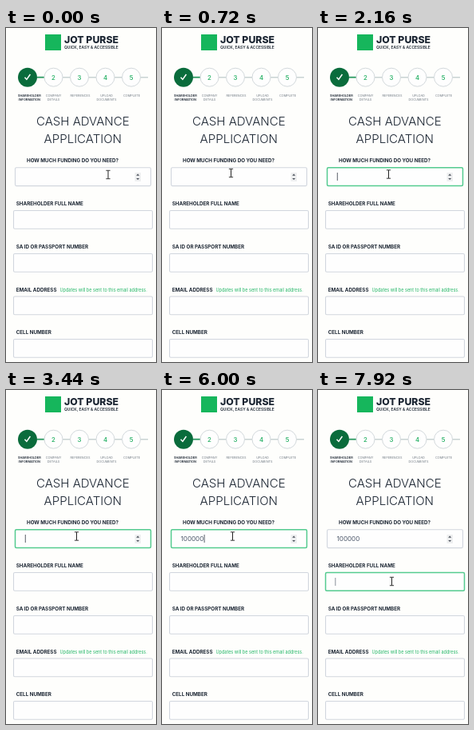
These frames come from a looping animation (188 px wide and 418 px high, 8000 ms). An HTML page with a canvas:

```html
<!DOCTYPE html>
<html lang="en">
<head>
<meta charset="utf-8">
<title>Cash advance application</title>
<style>
html, body { margin: 0; width: 100%; height: 100%; overflow: hidden; background: #fefefc; }
canvas { display: block; width: 188px; height: 418px; }
</style>
</head>
<body>
<canvas id="stage"></canvas>
<script>
const W = 188, H = 418, LOOP = 8000, BLINK = 530;
const canvas = document.getElementById('stage');
const ctx = canvas.getContext('2d');
const scale = window.devicePixelRatio || 1;
canvas.width = W * scale;
canvas.height = H * scale;

const INK = '#1c2633', GREEN = '#1fae60', DARK = '#0a6c3c', FOCUS = [84, 203, 143], IDLE = [209, 214, 222];
const FOCUS_AMOUNT = 960, FOCUS_NAME = 7600;
const KEYS = [3600, 4400, 4960, 5280, 5600, 5840];
const AMOUNT = '100000';
const STEP_Y = 61.7;

// time, x, y
const POINTER = [
  [80, 128, 183.5], [640, 86.5, 181.5], [720, 86.5, 181.5], [880, 88.5, 183],
  [6400, 88.5, 183], [6880, 85, 252.5], [7280, 85, 252.5], [7600, 92.5, 239.5]
];

const STEPS = [
  [27, 29.3, 'SHAREHOLDER', 'INFORMATION'],
  [59.5, 59.5, 'COMPANY', 'DETAILS'],
  [92, 93, 'REFERENCES', ''],
  [124.5, 126, 'UPLOAD', 'DOCUMENTS'],
  [157, 157.5, 'COMPLETE', '']
];

const FIELDS = [
  ['SHAREHOLDER FULL NAME', 228.5],
  ['SA ID OR PASSPORT NUMBER', 282.5],
  ['EMAIL ADDRESS', 336],
  ['CELL NUMBER', 389.5]
];

const clamp = v => Math.max(0, Math.min(1, v));
const ease = v => v * v * (3 - 2 * v);

function text(str, x, mid, size, weight, color, align = 'left') {
  ctx.font = `${weight} ${size}px Inter, "Open Sans", sans-serif`;
  ctx.textAlign = align;
  ctx.fillStyle = color;
  ctx.fillText(str, x, mid + size * 0.364);
}

function line(points, color, width) {
  ctx.beginPath();
  points.forEach(([x, y]) => ctx.lineTo(x, y));
  ctx.strokeStyle = color;
  ctx.lineWidth = width;
  ctx.stroke();
}

function circle(x, y, r, fill, stroke) {
  ctx.beginPath();
  ctx.arc(x, y, r, 0, Math.PI * 2);
  ctx.fillStyle = fill;
  ctx.fill();
  if (!stroke) return;
  ctx.strokeStyle = stroke;
  ctx.lineWidth = 1;
  ctx.stroke();
}

function field(x, y, w, focus) {
  const rgb = IDLE.map((c, i) => Math.round(c + (FOCUS[i] - c) * focus));
  ctx.beginPath();
  ctx.roundRect(x, y, w, 22.8, 1.5);
  ctx.fillStyle = '#fefefe';
  ctx.fill();
  ctx.strokeStyle = `rgb(${rgb})`;
  ctx.lineWidth = 1.1 + 0.4 * focus;
  ctx.stroke();
}

function caret(x, mid, age, color) {
  if (Math.floor(age / BLINK) % 2) return;
  line([[x, mid - 5], [x, mid + 5]], color, 0.8);
}

function header() {
  ctx.fillStyle = '#16b65c';
  ctx.fillRect(49, 8, 20, 20);
  text('JOT PURSE', 73, 14.7, 12.3, 800, INK);
  text('QUICK, EASY & ACCESSIBLE', 73, 24, 4.9, 600, INK);
}

function steps() {
  line([[39, STEP_Y], [48, STEP_Y]], '#2c9a62', 1.8);
  line([[71, STEP_Y], [178, STEP_Y]], '#c9d4d4', 1.6);
  STEPS.forEach(([x, labelX, top, bottom], i) => {
    const first = i === 0;
    circle(x, STEP_Y, first ? 12 : 11.5, first ? DARK : '#fefefe', first ? '' : '#d3d9dc');
    if (first) line([[23.5, 61.8], [25.9, 64.4], [30.4, 58]], '#fff', 1.5);
    else text(String(i + 1), x, STEP_Y, 7.8, 500, GREEN, 'center');
    const weight = first ? 600 : 400, color = first ? INK : '#747d87';
    text(top, labelX, 84.5, 3.88, weight, color, 'center');
    text(bottom, labelX, 90, 3.88, weight, color, 'center');
  });
}

function spinner() {
  ctx.fillStyle = '#eeeff0';
  ctx.fillRect(161.5, 181, 7.5, 11);
  ctx.fillStyle = '#49505a';
  for (const dir of [-1, 1]) {
    const y = 186.3 + dir * 1.6;
    ctx.beginPath();
    ctx.moveTo(163.2, y);
    ctx.lineTo(167.2, y);
    ctx.lineTo(165.2, y + dir * 2.2);
    ctx.fill();
  }
}

function amountField(t) {
  const focus = clamp((t - FOCUS_AMOUNT) / 160) * (1 - clamp((t - FOCUS_NAME) / 160));
  field(11.5, 174.8, 170, focus);
  spinner();
  const count = KEYS.filter(k => t >= k).length;
  const value = AMOUNT.slice(0, count);
  text(value, 23.5, 186, 8.1, 400, '#4a5568');
  if (t < FOCUS_AMOUNT || t >= FOCUS_NAME) return;
  const since = count ? KEYS[count - 1] : FOCUS_AMOUNT + 40;
  caret(24.3 + ctx.measureText(value).width, 186, Math.max(0, t - since), '#303844');
}

function form(t) {
  text('CASH ADVANCE', 96.3, 117, 15.05, 300, INK, 'center');
  text('APPLICATION', 96.3, 139, 15.05, 300, INK, 'center');
  text('HOW MUCH FUNDING DO YOU NEED?', 26, 166.2, 6.25, 700, INK);
  amountField(t);
  FIELDS.forEach(([label, y], i) => {
    text(label, 12.7, y - 8.5, 6.25, 700, INK);
    field(9.5, y, 174, i ? 0 : clamp((t - FOCUS_NAME) / 160));
  });
  text('Updates will be sent to this email address.', 67.5, 327.8, 5.5, 400, '#25b768');
  if (t >= FOCUS_NAME) caret(21.8, 240, t - FOCUS_NAME, '#6d757f');
}

function pointer(t) {
  let [, x, y] = POINTER[0];
  for (let i = 1; i < POINTER.length; i++) {
    const [t0, x0, y0] = POINTER[i - 1], [t1, x1, y1] = POINTER[i];
    if (t < t0) break;
    const k = ease(clamp((t - t0) / (t1 - t0)));
    x = x0 + (x1 - x0) * k;
    y = y0 + (y1 - y0) * k;
  }
  line([[x, y - 5], [x, y + 5]], '#222', 1);
  for (const end of [y - 5.2, y + 5.2]) line([[x - 2.6, end], [x + 2.6, end]], '#222', 0.9);
}

function draw(now) {
  const t = now % LOOP;
  ctx.setTransform(scale, 0, 0, scale, 0, 0);
  ctx.fillStyle = '#fefefc';
  ctx.fillRect(0, 0, W, H);
  header();
  steps();
  form(t);
  pointer(t);
}

function tick() {
  draw(performance.now());
  requestAnimationFrame(tick);
}
tick();
</script>
</body>
</html>
```
